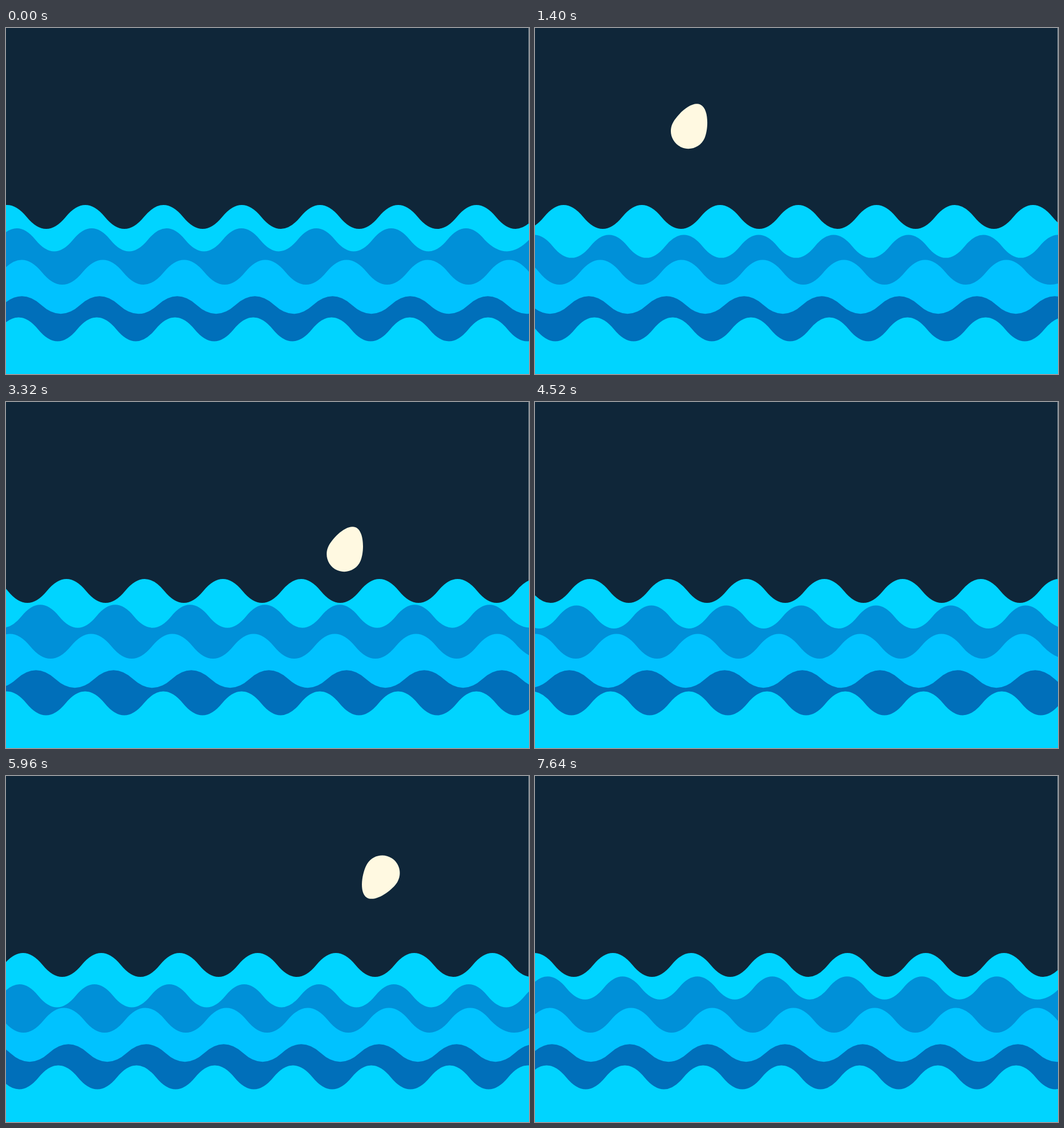
An HTML page that plays this animation: 920 by 608 pixels, repeating every 7680 ms.

```html
<!DOCTYPE html>
<html lang="en">
<head>
<meta charset="utf-8">
<title>Waves</title>
<style>
  html, body { margin: 0; width: 100%; height: 100%; overflow: hidden; background: #fff; }
  svg { display: block; width: 100%; height: 100%; }
</style>
</head>
<body>
<svg id="stage" viewBox="0 0 920 608">
  <rect width="919.5" height="608" fill="#0f2639"/>
</svg>
<script>
const LOOP = 7680, STEP = 40, SWING = 1920;
const stage = document.getElementById('stage');

// crest: x of the first crest, dx/dy: travel of one swing,
// last: index of the final crest, tail: half width of the trough after it
const waves = [
  { color: '#00d4ff', crest: 1.9,  period: 137.6, top: 311,   bottom: 353,   dx: -122.3, dy: 0,    last: 7 },
  { color: '#0090d8', crest: 19,   period: 131.7, top: 352,   bottom: 392.4, dx: 152.4,  dy: 15.7, last: 6, tail: 39 },
  { color: '#00c2ff', crest: 27.5, period: 142.9, top: 407.4, bottom: 451,   dx: -76.4,  dy: 0,    last: 6, tail: 42 },
  { color: '#006fba', crest: 28,   period: 136.6, top: 471.3, bottom: 502.2, dx: 91.3,   dy: 0,    last: 7 },
  { color: '#00d4ff', crest: 22,   period: 137.65, top: 508.5, bottom: 550.5, dx: -75.6, dy: 0,    last: 7 }
];

// Each leap: heights as [time, y]; x and angle run evenly through the values at time `at`
const leaps = [
  { at: 1400, x: 274, vx: 0.1, angle: 24, spin: 0.2,
    path: [[0, 510], [300, 262], [580, 165], [880, 140], [1400, 172], [1600, 217], [2100, 500]] },
  { at: 3320, x: 599, vx: 0.1, angle: 23, spin: 0.2,
    path: [[2340, 500], [2800, 330], [3200, 261], [3320, 258], [3700, 310], [4150, 500]] },
  { at: 5360, x: 598, vx: 0.0975, angle: 90, spin: 0.2035,
    path: [[4520, 500], [4800, 328], [5360, 194], [5600, 169.5], [5750, 166], [6400, 265], [6560, 372], [6760, 500]] }
];

function add(tag, attrs) {
  const node = document.createElementNS('http://www.w3.org/2000/svg', tag);
  for (const name in attrs) node.setAttribute(name, attrs[name]);
  return stage.appendChild(node);
}

function wavePath({ crest, period, top, bottom, last, tail }) {
  const half = period / 2, height = bottom - top, first = -3;
  const start = crest + first * period - period / 4;
  const arc = (width, rise) => `q${width / 2} ${rise} ${width} 0`;
  let d = `M${start} ${(top + bottom) / 2}`;
  for (let i = first; i <= last; i++) {
    const trough = i === last && tail ? tail * 2 : half;
    d += arc(half, -height) + arc(trough, height);
  }
  return d + `V700H${start}Z`;
}

let egg;
waves.forEach((wave, i) => {
  if (i === 2) {
    egg = add('path', {
      fill: '#fff9e1',
      d: 'M0-41C17.1-41 31-7.1 31 10S17.1 41 0 41-31 27.1-31 10-17.1-41 0-41Z'
    });
  }
  wave.node = add('path', { fill: wave.color, d: wavePath(wave) });
});

// Smooth curve through unevenly spaced points, flat at turning points
function curve(points, t) {
  const i = Math.max(0, points.findIndex(p => p[0] > t) - 1);
  const slope = k => (points[k + 1][1] - points[k][1]) / (points[k + 1][0] - points[k][0]);
  const tangent = k => {
    if (k === 0) return slope(0);
    if (k === points.length - 1) return slope(k - 1);
    const a = slope(k - 1), b = slope(k);
    return a * b <= 0 ? 0 : 2 * a * b / (a + b);
  };
  const [t0, y0] = points[i], [t1, y1] = points[i + 1];
  const span = t1 - t0, u = (t - t0) / span, v = 1 - u;
  return y0 * v * v * (1 + 2 * u) + y1 * u * u * (3 - 2 * u)
    + span * u * v * (tangent(i) * v - tangent(i + 1) * u);
}

function draw(t) {
  const swing = 1 - Math.abs(1 - (t / SWING) % 2);
  for (const { node, dx, dy } of waves) {
    node.setAttribute('transform', `translate(${dx * swing} ${dy * swing})`);
  }
  const leap = leaps.find(({ path }) => t >= path[0][0] && t < path[path.length - 1][0]);
  egg.setAttribute('visibility', leap ? 'visible' : 'hidden');
  if (leap) {
    const since = t - leap.at;
    const x = leap.x + leap.vx * since, angle = leap.angle + leap.spin * since;
    egg.setAttribute('transform', `translate(${x} ${curve(leap.path, t)}) rotate(${angle})`);
  }
}

const begin = performance.now();
function tick() {
  const t = (performance.now() - begin) % LOOP;
  draw(Math.floor(t / STEP) * STEP);
  requestAnimationFrame(tick);
}
tick();
</script>
</body>
</html>
```
